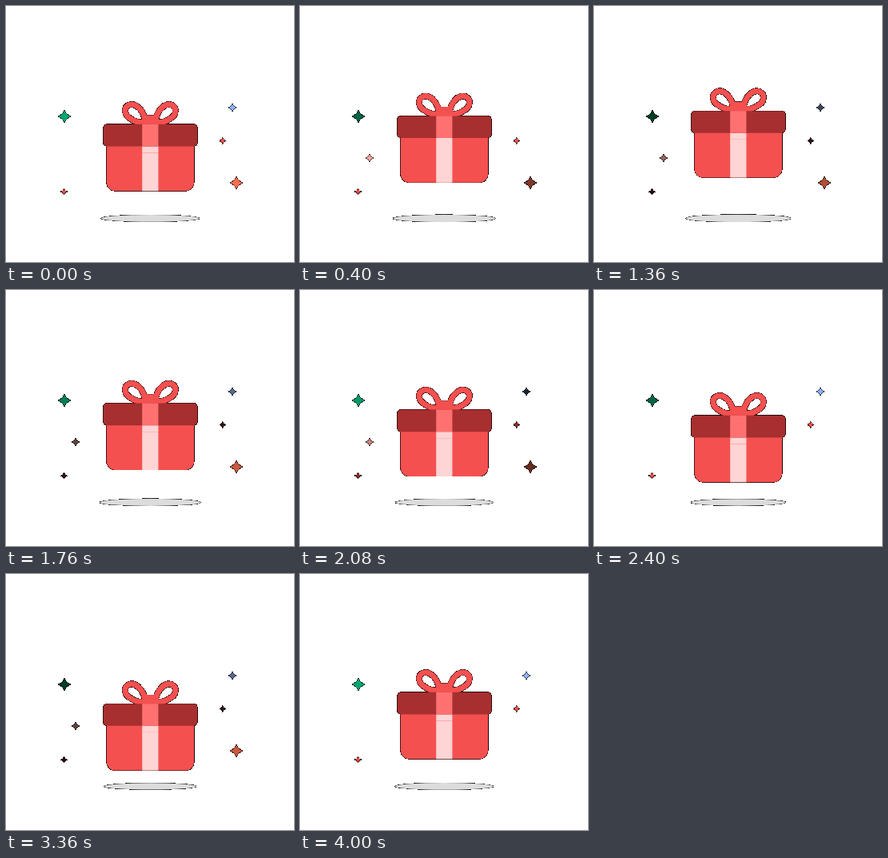
Animation of 360 by 320 pixels, one loop 4.04 s. Source, as an HTML page with a canvas:

```html
<!DOCTYPE html>
<html lang="en">
<head>
<meta charset="utf-8">
<title>Floating gift</title>
<style>
  html, body { margin: 0; width: 100%; height: 100%; overflow: hidden; background: #fff; }
  canvas { display: block; }
</style>
</head>
<body>
<canvas id="stage" width="360" height="320"></canvas>
<script>
const W = 360, H = 320, LOOP = 4040, STEP = 40, MID = 180.4;
const ctx = document.getElementById('stage').getContext('2d', { willReadFrequently: true });
const RED = '#f55050', PALE = '#ffd4d4';

// x, y, radius, colour, fade time in ms, opacity at the start
const stars = [
  [73, 138, 8, '#00a870', 1000, 1],
  [283, 127, 5, '#91b3f4', 400, 1],
  [270.7, 168.5, 3.8, RED, 200, 1],
  [72.5, 232, 3.8, RED, 200, 1],
  [288, 221, 8, '#f9704f', 800, 1],
  [87, 190, 5, '#faa89c', 400, 0],
];

// Falls from 1 to 0 in `half` ms, then rises again
const fade = (t, half) => Math.abs(1 - (t % (2 * half)) / half);

// Rises to 1 at 1 s, crosses 0 at 2 s, reaches -1 at 3 s
const sway = t => t < 3000 ? 1 - Math.abs(t - 1000) / 1000 : (t - 4000) / 1000;

function box(x, y, right, bottom, color, radii = 0) {
  ctx.fillStyle = color;
  ctx.beginPath();
  ctx.roundRect(x, y, right - x, bottom - y, radii);
  ctx.fill();
}

function star([x, y, r, color, half, start], t) {
  const alpha = fade(t, half), k = r * 0.22;
  ctx.globalAlpha = start ? alpha : 1 - alpha;
  ctx.fillStyle = color;
  ctx.beginPath();
  ctx.moveTo(x, y - r);
  ctx.quadraticCurveTo(x + k, y - k, x + r, y);
  ctx.quadraticCurveTo(x + k, y + k, x, y + r);
  ctx.quadraticCurveTo(x - k, y + k, x - r, y);
  ctx.quadraticCurveTo(x - k, y - k, x, y - r);
  ctx.fill();
  ctx.globalAlpha = 1;
}

function loop() {
  ctx.strokeStyle = RED;
  ctx.lineWidth = 7;
  ctx.beginPath();
  ctx.moveTo(174, 144);
  ctx.bezierCurveTo(172.3, 130, 162, 120.8, 154, 123.5);
  ctx.bezierCurveTo(146, 127, 148, 137, 156, 141);
  ctx.bezierCurveTo(162, 145, 168, 147, 174, 144);
  ctx.stroke();
}

function gift(dy) {
  ctx.save();
  ctx.translate(0, dy);
  loop();
  ctx.save();
  ctx.translate(2 * MID, 0);
  ctx.scale(-1, 1);
  loop();
  ctx.restore();
  box(170.2, 136.5, 190.4, 150, RED, [4, 4, 0, 0]);
  box(125.7, 165, 235.1, 231.2, RED, [0, 0, 11, 11]);
  // The two ribbon halves meet in a faint seam
  box(170.2, 170, 190.4, 183.4, PALE);
  box(170.2, 183.4, 190.4, 231.2, PALE);
  box(121.6, 147.8, 239.3, 175.4, '#a72f30', 5);
  box(170.2, 147.8, 190.4, 175.4, '#ff7171');
  ctx.restore();
}

function shadow(scale) {
  ctx.fillStyle = '#dcdcdc';
  ctx.beginPath();
  ctx.ellipse(MID, 265.4, 61.7 * scale, 4.42 * scale, 0, 0, 2 * Math.PI);
  ctx.fill();
}

// Blend every partly covered pixel with black, giving hard dark edges
function harden() {
  const image = ctx.getImageData(0, 0, W, H), d = image.data;
  for (let i = 0; i < d.length; i += 4) {
    const a = d[i + 3];
    if (!a || a === 255) continue;
    for (let c = 0; c < 3; c++) d[i + c] *= a / 255;
    d[i + 3] = 255;
  }
  ctx.putImageData(image, 0, 0);
}

function draw() {
  const t = Math.floor(performance.now() % LOOP / STEP) * STEP;
  const lift = sway(t);
  ctx.clearRect(0, 0, W, H);
  shadow(1 + lift * 0.1);
  gift(-lift * (lift > 0 ? 26 : 22.5));
  stars.forEach(s => star(s, t));
  harden();
  requestAnimationFrame(draw);
}
draw();
</script>
</body>
</html>
```
